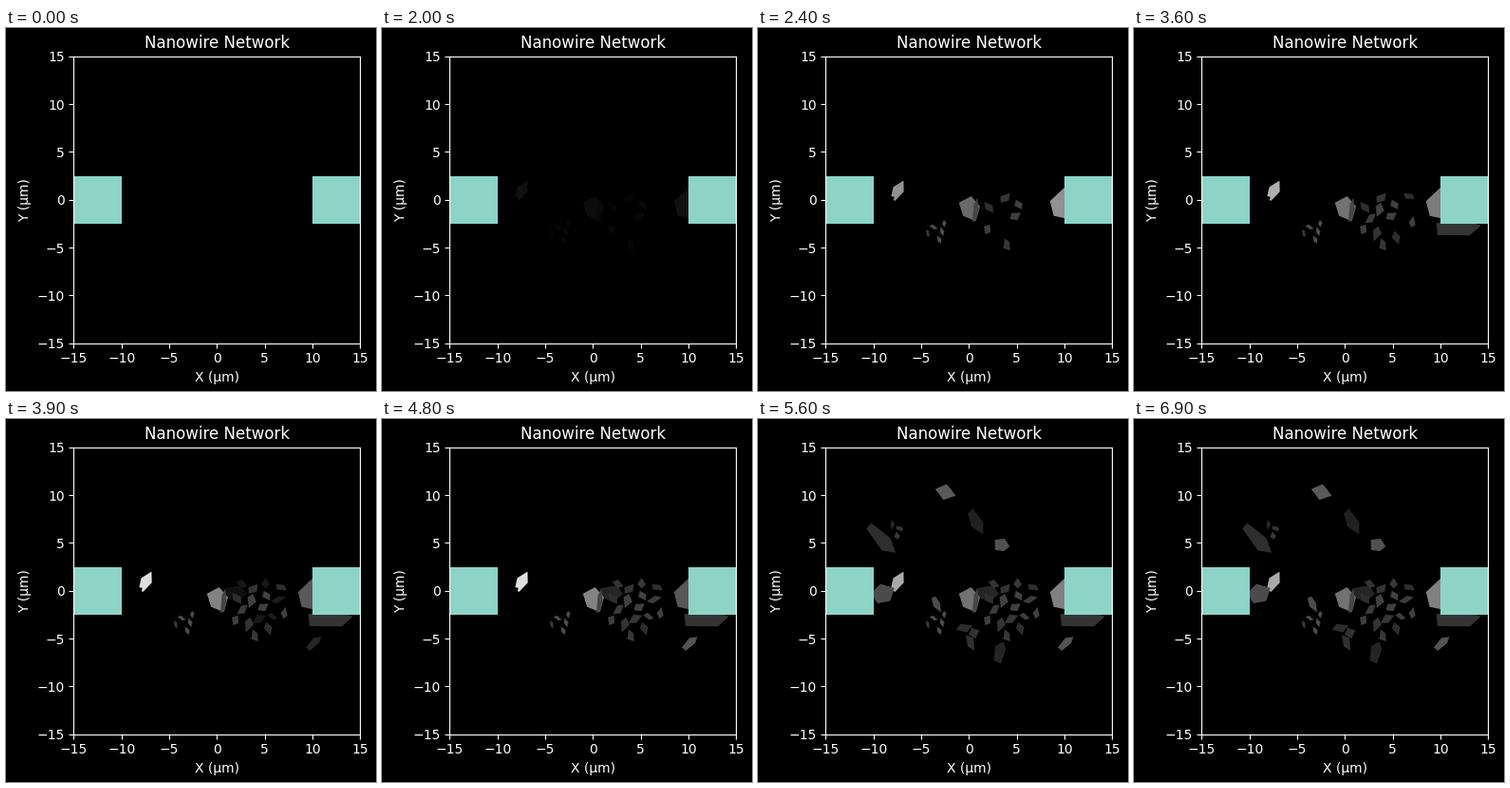
Recreate the animation shown at these times as a matplotlib script. Size 390 by 382 pixels, loop 8 s.

```python
import matplotlib.pyplot as plt
import numpy as np
from matplotlib.animation import FuncAnimation
from matplotlib.patches import Polygon, Rectangle

W, H, DPI = 390, 382, 100
LEFT, BOTTOM, SIDE = 71.4, 50.3, 302
FRAMES, STEP = 80, 100
GOLDEN = np.pi * (3 - np.sqrt(5))

# (first step, number of steps) of each fade-in
FIRST, SECOND, THIRD, FOURTH, LAST = (20, 3), (36, 1), (38, 3), (50, 3), (54, 3)

plt.style.use("dark_background")
plt.rcParams["font.family"] = "DejaVu Sans"
rng = np.random.default_rng(4)

fig = plt.figure(figsize=(W / DPI, H / DPI), dpi=DPI, facecolor="black")
ax = fig.add_axes([LEFT / W, BOTTOM / H, SIDE / W, SIDE / H], facecolor="black")
ax.set(xlim=(-15, 15), ylim=(-15, 15), xlabel="X (μm)", ylabel="Y (μm)",
       title="Nanowire Network")
ax.set_xticks(range(-15, 16, 5))
ax.set_yticks(range(-15, 16, 5))

for x in (-15, 10):
    ax.add_patch(Rectangle((x, -2.5), 5, 5, color="#8dd3c7", lw=0, zorder=2))

shards = []


def shard(born, center, length, width, tilt, grey, swing=0, corners=5):
    """Irregular polygon inscribed in a tilted ellipse."""
    k = np.arange(corners) + rng.uniform(-0.22, 0.22, corners)
    a = 2 * np.pi * k / corners
    z = 0.55 * (length * np.cos(a) + 1j * width * np.sin(a))
    z = center + z * np.exp(1j * np.radians(tilt))
    patch = Polygon(np.c_[z.real, z.imag], lw=0, color="black", zorder=1)
    ax.add_patch(patch)
    shards.append((patch, born, grey, swing))


def scatter(births, center, spread, count, size, grey):
    """Small shards on a golden-angle spiral, taking turns to appear."""
    for k in range(count):
        r = spread * np.sqrt((k + 0.5) / count)
        shard(births[k % len(births)], center + r * np.exp(1j * GOLDEN * k),
              size * rng.uniform(0.8, 1.3), size * rng.uniform(0.5, 0.8),
              rng.uniform(0, 180), grey * rng.uniform(0.8, 1.2), corners=4)


# Bulk of the network
shard(THIRD, 1.9 - 0.3j, 2.3, 1.8, -10, 37)
scatter([FIRST, SECOND, THIRD], 4.3 - 1.7j, 3.2, 17, 1.2, 55)
scatter([FIRST], -3.2 - 3.3j, 1.2, 5, 0.75, 68)
scatter([FOURTH], 0.1 - 4.4j, 1.1, 3, 1.4, 42)
scatter([LAST], -7.6 + 6.5j, 0.8, 3, 0.8, 46)

# Main conducting cells
shard(FIRST, -7.45 + 0.95j, 2.2, 1.1, 60, 145, swing=0.55)
shard(FIRST, 0.1 - 0.9j, 2.7, 1.9, -60, 105, swing=0.25)
shard(FIRST, 0.7 - 1.1j, 2.4, 0.6, 80, 70)
shard(FIRST, 9.9 - 0.4j, 3.4, 2.6, 90, 145, swing=-0.4)
shard(SECOND, 11.7 - 2.9j, 4.6, 2.0, 5, 52)

# Outer cells
shard(THIRD, 10.1 - 5.5j, 2.0, 0.8, 45, 82)
shard(FOURTH, 3.2 - 6.5j, 2.3, 1.2, 80, 36)
shard(FOURTH, -3.4 - 1.4j, 1.8, 0.7, -65, 76)
shard(LAST, -2.45 + 10.3j, 2.1, 1.5, -30, 90, corners=4)
shard(LAST, -9.2 + 5.4j, 3.9, 1.5, -48, 46)
shard(LAST, 0.75 + 7.2j, 2.8, 1.2, -65, 32)
shard(LAST, 3.35 + 4.8j, 1.7, 1.3, 0, 80)
shard(LAST, -9.0 - 0.3j, 2.4, 1.9, 20, 75)


def ramp(i, start, steps):
    return np.clip((i - start + 1) / steps, 0, 1)


def draw(i):
    # Current shifts between the main cells, then settles back.
    shift = 1 - (1 - ramp(i, 36, 5)) ** 2 - 0.7 * ramp(i, 50, 7)
    for patch, born, grey, swing in shards:
        level = grey * ramp(i, *born) ** 2 * (1 + swing * shift) / 255
        patch.set_facecolor((level,) * 3)
    return [s[0] for s in shards]


anim = FuncAnimation(fig, draw, frames=FRAMES, interval=STEP,
                     init_func=lambda: draw(0), repeat=True, repeat_delay=0)
plt.show()
```
